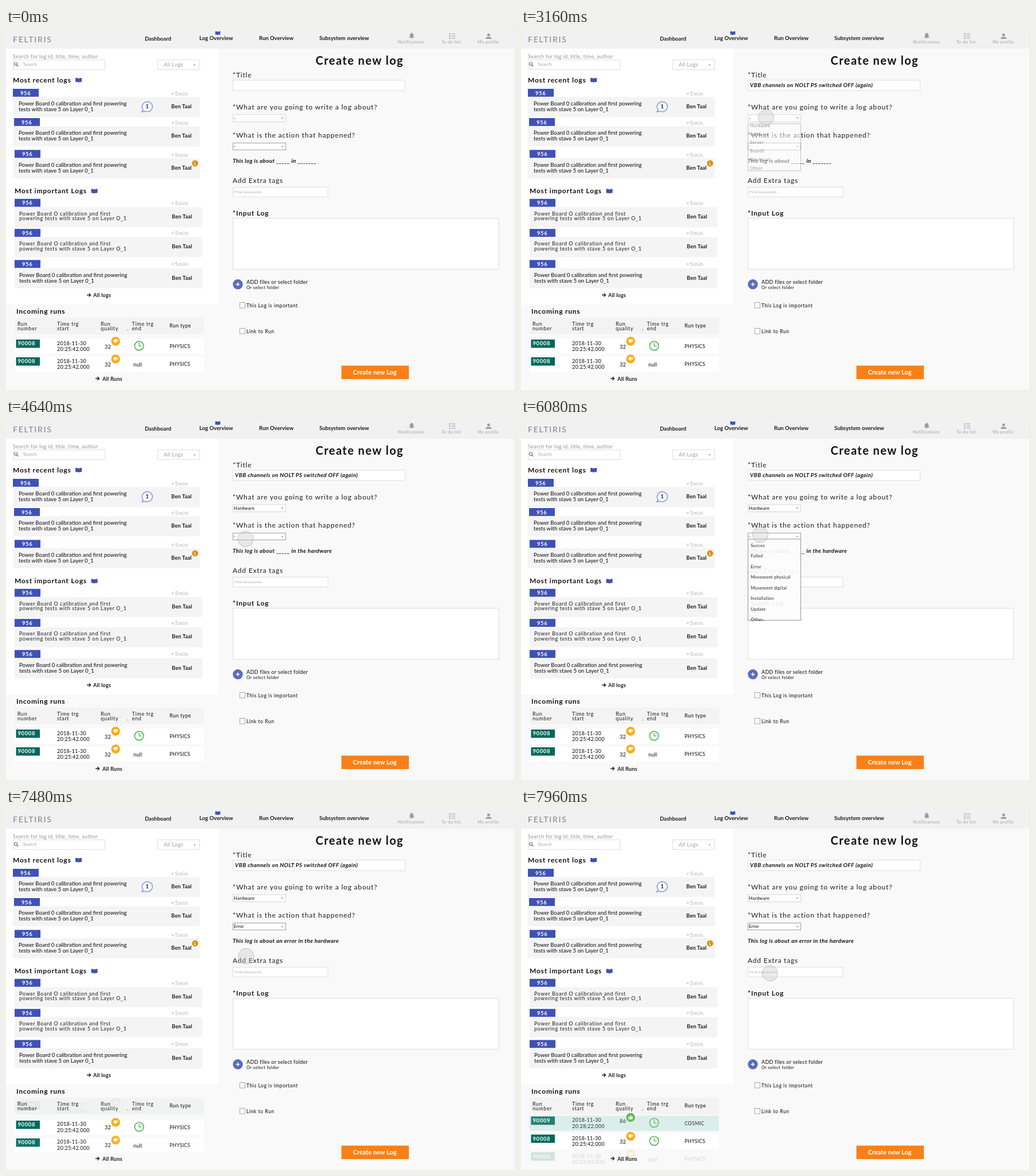
An HTML page that plays this animation: 887x631 px, repeating every 8 s.

```html
<!DOCTYPE html>
<html lang="en">
<head>
<meta charset="utf-8">
<title>Create new log</title>
<style>
html, body { margin: 0; width: 100%; height: 100%; overflow: hidden; background: #f9f9f9; }
svg { display: block; width: 887px; height: 631px; font-family: Lato, "Open Sans", sans-serif; }
text { white-space: pre; }
</style>
</head>
<body>
<svg id="stage" viewBox="0 0 887 631" width="887" height="631"></svg>
<script>
const NS = 'http://www.w3.org/2000/svg';
const stage = document.getElementById('stage');
const BLUE = '#3f51b5', INK = '#1c1c1c', GREY = '#b3b3b8', LINE = '#dedede';
const AUTHOR = 'Ben Taal';

function add(parent, tag, attrs, content) {
  const el = document.createElementNS(NS, tag);
  for (const k in attrs) el.setAttribute(k, attrs[k]);
  if (content) el.textContent = content;
  parent.appendChild(el);
  return el;
}
const group = (parent = stage, attrs = {}) => add(parent, 'g', attrs);
const rect = (p, x, y, w, h, fill, stroke) =>
  add(p, 'rect', { x, y, width: w, height: h, fill, stroke: stroke || 'none' });
const circle = (p, cx, cy, r, fill, extra = {}) => add(p, 'circle', { cx, cy, r, fill, ...extra });
const path = (p, d, extra) => add(p, 'path', { d, ...extra });

// text style: [size, weight, letter spacing, fill, font style]
const STYLE = {
  nav: [9.5, 700, 0, INK],
  tool: [7, 700, .5, GREY],
  head: [12, 700, .78, '#111'],
  label: [12, 400, .81, INK],
  log: [9.6, 500, 0, INK],
  wide: [9, 400, .6, INK],
  author: [9.2, 700, .18, INK],
  age: [9.5, 400, .75, '#b0b0b0'],
  badge: [9.5, 700, .6, '#fff'],
  cell: [9, 500, .25, INK],
  type: [8.5, 500, .3, INK],
  title: [20, 700, 1.45, '#111'],
  quote: [9.8, 700, .4, '#111', 'italic'],
  small: [8.5, 500, .55, INK],
  item: [7.5, 500, .3, INK],
  value: [8, 500, .2, '#111']
};
function text(p, x, y, str, style, extra = {}) {
  const [size, weight, gap, fill, slant] = Array.isArray(style) ? style : STYLE[style];
  return add(p, 'text', {
    x, y, fill, 'font-size': size, 'font-weight': weight, 'letter-spacing': gap,
    'font-style': slant || 'normal', ...extra
  }, str);
}

function book(x, y, s = 1) {
  path(stage, 'M-5.5-4Q-2-4.4 0-2.8Q2-4.4 5.5-4V3.2Q2 2.6 0 4Q-2 2.6-5.5 3.2Z',
    { fill: BLUE, transform: `translate(${x} ${y}) scale(${s})` });
}
function caret(x, y) {
  path(stage, `M${x - 1.8} ${y - 1}h3.6l-1.8 2.2z`, { fill: '#888' });
}
function arrow(x, y) {
  path(stage, `M${x} ${y}h6.5m-3-3l3 3l-3 3`, { fill: 'none', stroke: INK, 'stroke-width': 1.3 });
}

function drawHeader() {
  rect(stage, 0, 0, 887, 36, '#f1f1f1');
  rect(stage, 0, 36, 370, 446, '#fff');
  rect(stage, 886, 0, 1, 631, '#ececec');
  text(stage, 12, 25, 'FELTIRIS', [14, 500, 1.75, '#888b98']);
  text(stage, 242, 21.5, 'Dashboard', 'nav');
  text(stage, 337, 20.5, 'Log Overview', 'nav');
  text(stage, 441, 21, 'Run Overview', 'nav');
  text(stage, 546, 21, 'Subsystem overview', 'nav');
  book(369, 9, .8);
  const ico = { fill: '#9c9ca6' };
  path(stage, 'M12 22c1.1 0 2-.9 2-2h-4c0 1.1.9 2 2 2zm6-6v-5c0-3.1-1.6-5.6-4.5-6.3V4a1.5 1.5 0 0 0-3 0v.7C7.6 5.4 6 7.9 6 11v5l-2 2v1h16v-1z',
    { ...ico, transform: 'translate(700.4 6.6) scale(.55)' });
  for (let i = 0; i < 3; i++) {
    const y = 10.2 + i * 3.8;
    path(stage, `M772 ${y}l1 1l1.8-2M776.5 ${y}h6.5`, { fill: 'none', stroke: '#9c9ca6', 'stroke-width': 1.1 });
  }
  circle(stage, 841, 12, 2.5, ico.fill);
  path(stage, 'M836 19v-1.2q0-2.4 5-2.4t5 2.4V19z', ico);
  text(stage, 683, 27, 'Notifications', 'tool');
  text(stage, 759, 27, 'To-do list', 'tool');
  text(stage, 822, 27, 'My profile', 'tool');
}

function logCard(badgeX, badgeY, x, w, wide) {
  rect(stage, badgeX, badgeY, 45, 13.8, BLUE);
  text(stage, badgeX + 13, badgeY + 10.5, '956', 'badge');
  text(stage, 288, badgeY + (wide === undefined ? 12.2 : 11), '+5min', 'age');
  rect(stage, x, badgeY + 14.4, w, 35, '#f4f4f4');
  const y = badgeY + 29.4;
  if (wide) {
    text(stage, 23, y - .6, 'Power Board O calibration and first', 'wide');
    text(stage, 23, y + 7.9, 'powering tests with stave 5 on Layer O_1', 'wide');
  } else {
    const tx = wide === undefined ? 22 : 23;
    text(stage, tx, y, 'Power Board 0 calibration and first powering', 'log');
    text(stage, tx, y + 10, 'tests with stave 5 on Layer 0_1', 'log');
  }
  text(stage, wide === undefined ? 288 : 289, badgeY + 34.2, AUTHOR, 'author');
}

function drawSidebar() {
  text(stage, 12, 52.5, 'Search for log id, title, time, author', [9, 400, .33, '#8f929c']);
  rect(stage, 12.5, 55.5, 160, 17, '#fff', LINE);
  circle(stage, 17, 62.6, 2.6, 'none', { stroke: '#777', 'stroke-width': 1.2 });
  path(stage, 'M18.9 64.6l2.4 2.4', { stroke: '#777', 'stroke-width': 1.4 });
  text(stage, 30, 66, 'Search', [7, 400, .5, '#999']);
  rect(stage, 264.5, 55.5, 73, 17, '#fff', LINE);
  text(stage, 275, 67, 'All Logs', [9, 400, .4, '#9b9ba0']);
  caret(328.5, 64.5);

  text(stage, 12, 94.5, 'Most recent logs', 'head');
  book(126.5, 91);
  logCard(12, 106, 12, 326);
  logCard(14, 157, 12, 326);
  logCard(15, 212.5, 12, 326);
  path(stage, 'M239.2 142.6L236.8 146L243 145.2A9 8.6 0 1 0 239.2 142.6Z',
    { fill: '#fff', stroke: '#92a2ee', 'stroke-width': 1.8 });
  text(stage, 243.2, 139.6, '1', [9.5, 700, 0, INK]);
  circle(stage, 329.5, 236, 5.4, '#d8900f');
  text(stage, 327.8, 238.6, 'L', [7, 700, 0, '#fff']);

  text(stage, 15, 288, 'Most important Logs', 'head');
  book(154, 284.5);
  logCard(15, 297.8, 15, 327, true);
  logCard(15, 350.2, 15, 327, true);
  logCard(15, 404.4, 15, 327, false);
  arrow(141, 465.5);
  text(stage, 152, 469, 'All logs', 'author');
}

const THUMB = 'M15 3H6q-1.3 0-1.8 1.2l-3 7.1Q1 11.6 1 12v2q0 2 2 2h6.3l-1 4.6q-.1.8.4 1.4L9.8 23l6.6-6.6q.6-.6.6-1.4V5q0-2-2-2zm4 0v12h4V3z';
function runRow(r) {
  const g = group();
  rect(g, 15, 541.5, 330, 26.5, r.bg);
  rect(g, 17.5, 543, 41.5, 14.5, '#00695c');
  text(g, 20.5, 553.4, r.id, 'badge');
  text(g, 89, 552.5, '2018-11-30', 'cell');
  text(g, 89, 563, r.time, 'cell');
  const lift = r.good ? -1.5 : 0;
  text(g, 172, 558.5 + lift * 3, r.quality, 'cell');
  circle(g, 191, 546 + lift, 7.7, r.good ? '#4caf2f' : '#fcab10');
  path(g, THUMB, {
    fill: '#fff',
    transform: `translate(191 ${546 + lift}) rotate(${r.good ? 180 : 0}) scale(.36) translate(-12 -12.5)`
  });
  if (r.clock) {
    circle(g, 232, 554, 7.8, 'none', { stroke: '#66bb6a', 'stroke-width': 1.9 });
    path(g, 'M232 549v5.2h4.3', { fill: 'none', stroke: '#66bb6a', 'stroke-width': 1.5 });
  } else {
    text(g, 222, 558.8, 'null', 'cell');
  }
  text(g, 285, 558, r.type, 'type');
  return g;
}

function drawRuns() {
  text(stage, 18, 497.5, 'Incoming runs', 'head');
  rect(stage, 15, 505, 330, 28.5, '#f3f3f3');
  [[20, 'Run', 'number'], [89, 'Time trg', 'start'], [165, 'Run', 'quality'], [219.5, 'Time trg', 'end']]
    .forEach(([x, a, b]) => {
      text(stage, x, 518.5, a, 'wide');
      text(stage, x, 527, b, 'wide');
    });
  text(stage, 211, 527, '.', 'wide');
  text(stage, 285, 522, 'Run type', [8.8, 500, .35, INK]);
  const old = { id: '90008', time: '20:25:42.000', quality: '32', type: 'PHYSICS', bg: '#fff' };
  const rows = {
    last: runRow(old),
    first: runRow({ ...old, clock: true }),
    fresh: runRow({ id: '90009', time: '20:28:22.000', quality: '86', type: 'COSMIC', bg: '#d6ecea', clock: true, good: true })
  };
  arrow(156, 611);
  text(stage, 168, 614.5, 'All Runs', 'author');
  return rows;
}

function drawForm() {
  const x = 395;
  text(stage, 539.5, 64, 'Create new log', 'title');
  text(stage, x, 85.5, '*Title', 'label');
  rect(stage, 395.5, 91, 300, 18, '#fff', LINE);
  text(stage, x, 142, '*What are you going to write a log about?', 'label');
  rect(stage, 395.5, 151, 92, 12.5, '#fff', '#d6d6d6');
  caret(481.5, 157);
  text(stage, x, 191, '*What is the action that happened?', 'label');
  rect(stage, 395.5, 200.5, 92, 12, '#fff', '#a0a0a0');
  caret(481.5, 206.8);
  text(stage, x, 270, 'Add Extra tags', 'label');
  rect(stage, 395.5, 277.5, 165.5, 17, '#fff', LINE);
  text(stage, 398, 288, 'Find keywords', [6.5, 400, .5, '#a5a5a5']);
  text(stage, x, 326.5, '*Input Log', [12, 700, .78, INK]);
  rect(stage, 395.5, 331.5, 463, 89, '#fff', LINE);
  circle(stage, 404, 446.8, 8.7, '#5c6bc0');
  path(stage, 'M400.7 446.8h6.6M404 443.5v6.6', { stroke: '#fff', 'stroke-width': 1.5 });
  text(stage, 419, 446, 'ADD files or select folder', [9, 500, .28, INK]);
  text(stage, 419, 455, 'Or select folder', [7.5, 500, .38, INK]);
  rect(stage, 407.5, 478.5, 9, 9.5, '#fff', '#a6a6a6');
  text(stage, 419, 486.5, 'This Log is important', 'small');
  rect(stage, 407.5, 523.5, 9, 9.5, '#fff', '#a6a6a6');
  text(stage, 419, 531.5, 'Link to Run', 'small');
  rect(stage, 584.5, 588.5, 117.5, 23.5, '#f88017');
  text(stage, 604.5, 604.3, 'Create new Log', [11, 700, 0, '#fff']);
  return {
    entry: text(stage, 399, 103, 'VBB channels on NOLT PS switched OFF (again)', 'quote'),
    topic: ['-', 'Hardware'].map(s => text(stage, 397, 160, s, 'value')),
    action: ['-', 'Error'].map(s => text(stage, 397, 209, s, [7.6, 500, .2, '#111'])),
    lines: ['_____ in _______', '_____ in the hardware', 'an error in the hardware']
      .map(s => text(stage, x, 235, 'This log is about ' + s, 'quote'))
  };
}

function menu(top, height, x, y, step, items, fill) {
  const g = group();
  const box = rect(g, 395.5, top, 92, height, '#fdfdfd', '#8f8f8f');
  items.forEach((s, i) => text(g, x, y + i * step, s, [7.5, 500, items.length > 6 ? .3 : .4, fill]));
  return { g, box, height };
}

drawHeader();
drawSidebar();
const rows = drawRuns();
const form = drawForm();
const topics = menu(167, 88, 399, 172.8, 14.8,
  ['Hardware', 'Software', 'Server', 'Boards', 'Electrical', 'Other'], '#4a4a4a');
const actions = menu(211, 152, 400.5, 224.5, 18.5,
  ['Succes', 'Failed', 'Error', 'Movement physical', 'Movement digital', 'Installation', 'Update', 'Other..'], '#222');
const pointer = circle(stage, 0, 0, 13.6, '#c8c8c8',
  { 'fill-opacity': .36, stroke: '#999', 'stroke-opacity': .5, 'stroke-width': 1 });

const ramp = (t, start, dur) => Math.min(1, Math.max(0, (t - start) / dur));
const smooth = (t, start, dur) => { const u = ramp(t, start, dur); return u * u * (3 - 2 * u); };
const easeOut = (t, start, dur) => 1 - (1 - ramp(t, start, dur)) ** 2;
const fade = (el, v) => el.setAttribute('opacity', v.toFixed(3));
const shift = (el, y) => el.setAttribute('transform', `translate(0 ${y.toFixed(2)})`);

// pointer moves: start, duration, x, y
const MOVES = [
  [340, 800, 441, 104], [2060, 820, 427, 156], [3180, 560, 418, 175], [3840, 800, 417.5, 211],
  [4820, 400, 417, 203], [6040, 780, 417, 256], [7360, 800, 437, 294]
];

function setMenu(m, open, alpha) {
  m.box.setAttribute('height', (m.height * open).toFixed(2));
  fade(m.g, alpha);
}

function draw(t) {
  let x = 802, y = 15;
  for (const [start, dur, tx, ty] of MOVES) {
    const p = smooth(t, start, dur);
    x += (tx - x) * p;
    y += (ty - y) * p;
  }
  pointer.setAttribute('cx', x.toFixed(2));
  pointer.setAttribute('cy', y.toFixed(2));
  fade(pointer, t >= 360 ? 1 : 0);
  fade(form.entry, t >= 1600 ? 1 : 0);

  const a = smooth(t, 3740, 300), b = smooth(t, 6940, 300);
  setMenu(topics, easeOut(t, 2940, 300), ramp(t, 2940, 420) * (1 - a));
  const open = easeOut(t, 5860, 300);
  setMenu(actions, open, open * (1 - b));
  fade(form.topic[0], 1 - a);
  fade(form.topic[1], a);
  fade(form.action[0], 1 - b);
  fade(form.action[1], b);
  fade(form.lines[0], 1 - a);
  fade(form.lines[1], a * (1 - b));
  fade(form.lines[2], b);

  const p = smooth(t, 7360, 800);
  shift(rows.first, 31 * p);
  shift(rows.last, 31 + 31 * p);
  shift(rows.fresh, -34 * (1 - p));
  fade(rows.last, 1 - p);
  fade(rows.fresh, p);
}

function tick() {
  draw(performance.now() % 8000);
  requestAnimationFrame(tick);
}
tick();
</script>
</body>
</html>
```
